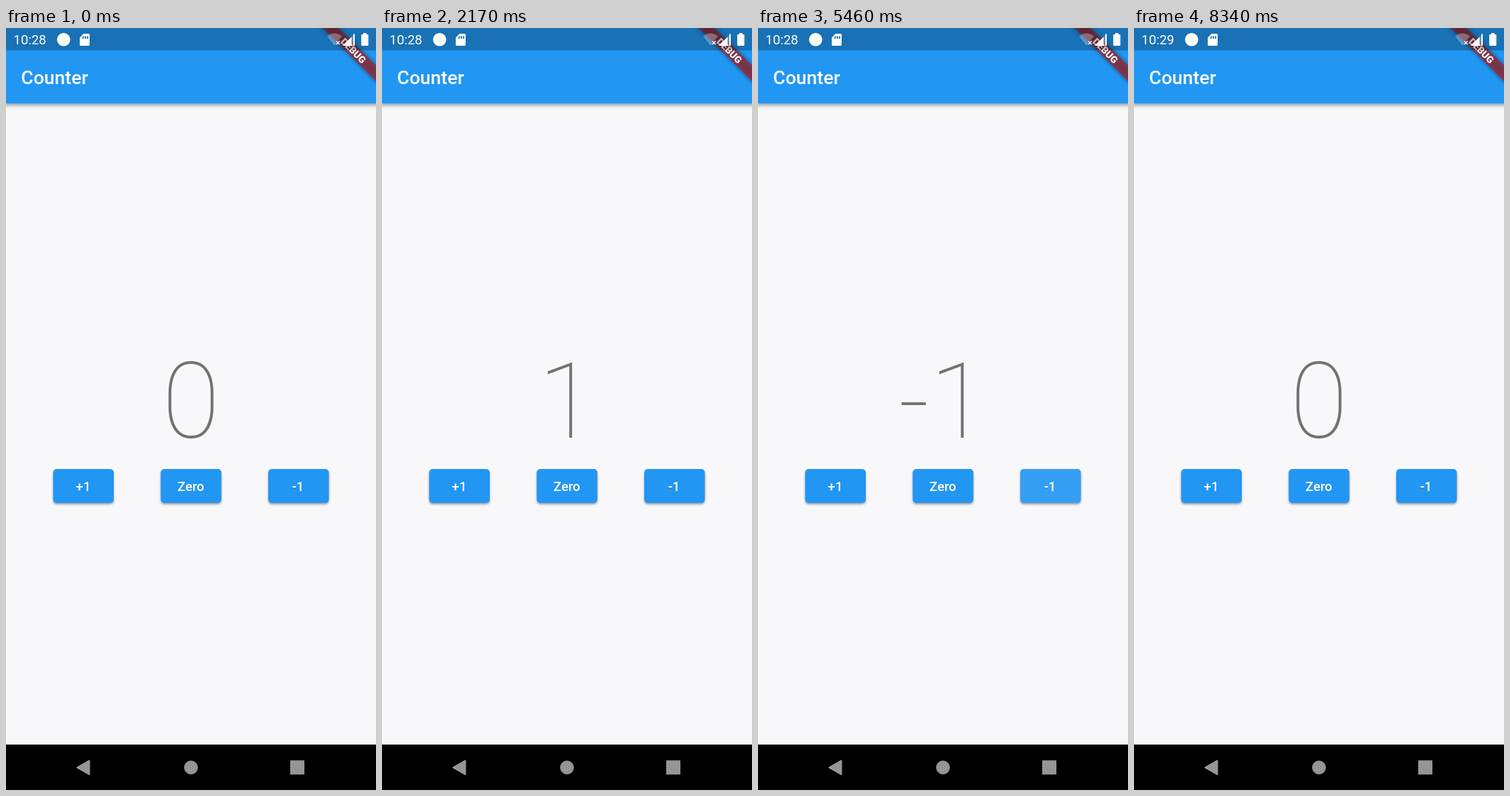
An HTML page that plays this animation: 522x1073 px, repeating every 8.39 s.

```html
<!DOCTYPE html>
<html lang="en">
<head>
<meta charset="utf-8">
<title>Counter</title>
<style>
  html, body { margin: 0; width: 100%; height: 100%; overflow: hidden; background: #f8f8fb; }
  svg { display: block; width: 100%; height: 100%; font-family: Roboto, sans-serif; }
  .bar { fill: #2196f3; filter: drop-shadow(0 3px 2.5px rgba(0, 0, 0, .34)); }
  .btn { fill: #2196f3; filter: drop-shadow(0 2px 1.6px rgba(0, 0, 0, .38)); }
  .label { font-size: 18.6px; font-weight: 500; text-anchor: middle; fill: #fff; }
  #count { font-size: 148.9px; font-weight: 100; text-anchor: middle; fill: #727273; }
  .banner { fill: rgba(183, 28, 28, .627); }
  .debug { font-size: 13.55px; font-weight: 900; text-anchor: middle; fill: #fff; }
</style>
</head>
<body>
<svg viewBox="0 0 522 1073" preserveAspectRatio="none">
  <defs>
    <clipPath id="keys">
      <rect x="66.5" y="621" width="85.5" height="47.8" rx="5"/>
      <rect x="218.3" y="621" width="85.5" height="47.8" rx="5"/>
      <rect x="370" y="621" width="85.5" height="47.8" rx="5"/>
    </clipPath>
    <filter id="soft" x="-20%" y="-60%" width="140%" height="220%"><feGaussianBlur stdDeviation="3"/></filter>
  </defs>
  <rect width="522" height="1073" fill="#f8f8fb"/>

  <text id="count" x="261" y="577">0</text>
  <rect class="btn" x="66.5" y="621" width="85.5" height="47.8" rx="5"/>
  <rect class="btn" x="218.3" y="621" width="85.5" height="47.8" rx="5"/>
  <rect class="btn" x="370" y="621" width="85.5" height="47.8" rx="5"/>
  <g clip-path="url(#keys)"><circle id="ripple" cy="656" r="0" fill="#fff"/></g>
  <g class="label">
    <text x="109" y="652">+1</text>
    <text x="260.8" y="652">Zero</text>
    <text x="412" y="652">-1</text>
  </g>

  <rect class="bar" x="-10" y="-10" width="542" height="116.3"/>
  <text x="21.3" y="79.2" font-size="26.6" font-weight="500" fill="#fff">Counter</text>

  <g transform="translate(522 0) rotate(45)">
    <rect x="-60" y="37.2" width="120" height="16" fill="#000" opacity=".4" filter="url(#soft)"/>
    <rect class="banner" x="-60" y="37.2" width="120" height="16"/>
    <text class="debug" x="0" y="50">DEBUG</text>
  </g>

  <!-- status bar -->
  <rect width="522" height="31.5" fill="#000" opacity=".25"/>
  <g fill="#fff">
    <text id="clock" x="10.5" y="23" font-size="18.6">10:28</text>
    <circle cx="81.3" cy="16.3" r="9.3"/>
    <path fill-rule="evenodd" d="M109.5 8h7q1.5 0 1.5 1.5v14q0 1.500-1.500 1.500h-11q-1.500 0-1.500-1.500v-10z
      M108 11.500h1.800v3.600h-1.800z M111.100 11.500h1.800v3.600h-1.800z M114.200 11.500h1.800v3.600h-1.800z"/>
    <path d="M453 11.500q10.500-8 21 0l-5 6.200h-3.500v4.500l-2 2.500z" opacity=".3"/>
    <path d="M465.800 18.300l5 5m0-5l-5 5" stroke="#fff" stroke-width="1.500"/>
    <path d="M475 25L492 8v17z" opacity=".3"/>
    <path d="M475 25L487.500 12.500V25z M490 8.500h2V25h-2z"/>
    <path d="M504 7h4.500v2h1.500q1.300 0 1.300 1.300v13.400q0 1.300-1.300 1.300h-7.500q-1.300 0-1.300-1.300V10.300q0-1.300 1.300-1.300h1.500z"/>
  </g>

  <!-- navigation bar -->
  <rect y="1009" width="522" height="64"/>
  <g fill="#959595" stroke="#959595" stroke-linejoin="round">
    <path d="M100.500 1041.300L117.500 1031.500v19.600z" stroke-width="2"/>
    <circle cx="261" cy="1041.300" r="9.300"/>
    <rect x="402" y="1032.300" width="18" height="18" stroke-width="2"/>
  </g>
</svg>
<script>
const LOOP = 8390;
const MINUTE = 7600;
// [time, touch x, new value]
const taps = [
  [1650, 115, 1],
  [3030, 115, 2],
  [4225, 262, 0],
  [5180, 415, -1],
  [6020, 415, -2],
  [7150, 262, 0]
];
const el = id => document.getElementById(id);
const count = el('count'), clock = el('clock'), ripple = el('ripple');

function setText(node, text) {
  if (node.textContent !== text) node.textContent = text;
}

function draw(t) {
  const [start, x, value] = taps.filter(tap => tap[0] <= t).pop() || [-LOOP, 0, 0];
  const age = t - start;
  setText(count, String(value));
  setText(clock, t < MINUTE ? '10:28' : '10:29');
  ripple.setAttribute('cx', x);
  ripple.setAttribute('r', Math.min(age * .27, 70));
  ripple.setAttribute('opacity', .1 * Math.max(0, Math.min(1, age / 40, (440 - age) / 190)));
}

const origin = performance.now();
function frame() {
  draw((performance.now() - origin) % LOOP);
  requestAnimationFrame(frame);
}
frame();
</script>
</body>
</html>
```
